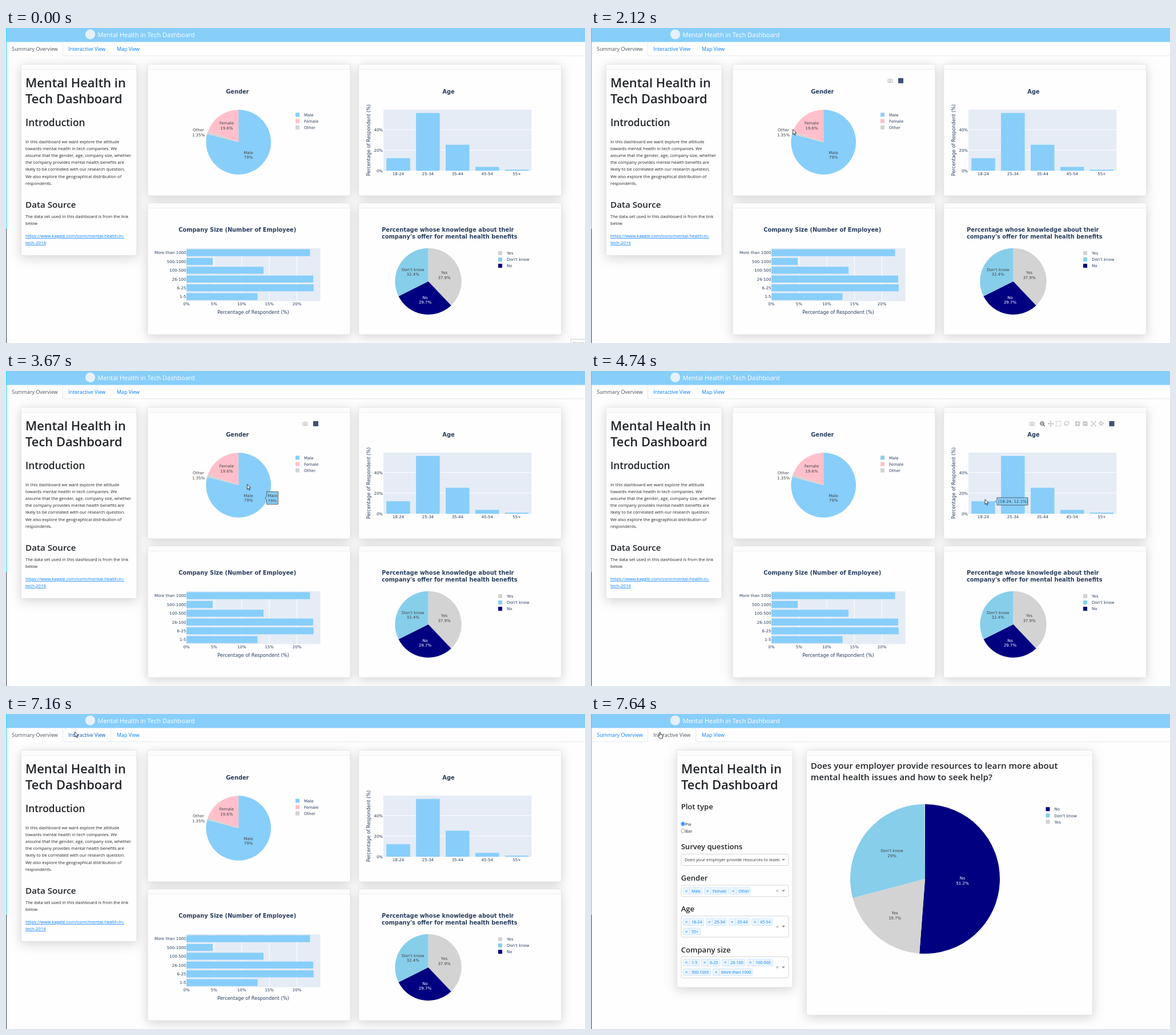
Recreate the animation shown at these times as an HTML page. Size 1014 px wide and 552 px high, loop 8000 ms.

```html
<!DOCTYPE html>
<html lang="en">
<head>
<meta charset="utf-8">
<title>Mental Health in Tech Dashboard</title>
<style>
html, body { margin: 0; width: 100%; height: 100%; overflow: hidden; background: #fefefe; }
svg { display: block; width: 100vw; height: 100vh; }
text { font-family: "Open Sans", "Noto Sans", sans-serif; white-space: pre; }
.h { font-weight: 600; }
.p, .b { font-family: "DejaVu Sans", sans-serif; }
.b { font-weight: 700; }
.card { fill: #fefefe; stroke: #dfdfdf; stroke-width: .7; filter: drop-shadow(0 4.7px 9.4px rgba(0,0,0,.17)); }
.icon { fill: none; stroke: #c4c4c4; stroke-width: 1.2; }
</style>
</head>
<body>
<svg id="stage" viewBox="0 0 1014 552"></svg>
<script>
const SKY = '#87cefa', NAVY = '#000080', GRAY = '#d3d3d3', PINK = '#ffc0cb', CYAN = '#87ceeb';
const INK = '#212529', PLOT = '#2a3f5f', LINK = '#007bff', DARK = '#444';

const rect = (x, y, w, h, fill, extra = '') =>
  `<rect x="${x}" y="${y}" width="${w}" height="${h}" fill="${fill}" ${extra}/>`;
const path = (d, extra = '') => `<path d="${d}" ${extra}/>`;
const text = (x, y, s, size, fill = INK, cls = '', anchor = 'start', extra = '') =>
  `<text x="${x}" y="${y}" font-size="${size}" fill="${fill}" class="${cls}" text-anchor="${anchor}" ${extra}>${s}</text>`;
const lines = (x, y, step, list, size, fill, cls, anchor, extra) =>
  list.map((s, i) => text(x, y + i * step, s, size, fill, cls, anchor, extra)).join('');
const plot = (x, y, s, anchor = 'middle', fill = PLOT, size = 7) => text(x, y, s, size, fill, 'p', anchor);
const group = (id, body) => `<g id="${id}">${body}</g>`;

const card = (x, y, w, h) => rect(x, y, w, h, '#fefefe', 'class="card" rx="2"') +
  rect(x, y + .4, w, 8.6, '#000', 'opacity=".008"') +
  path(`M${x} ${y + 9}h${w}`, 'stroke="#efefef"');

// Slices: [share, colour, label x, label y, name, label colour]
function pie(cx, cy, r, slices) {
  let from = 0, shapes = '', labels = '';
  const at = p => `${cx + r * Math.sin(p * 2 * Math.PI)} ${cy - r * Math.cos(p * 2 * Math.PI)}`;
  for (const [share, fill, x, y, name, ink = DARK] of slices) {
    const to = from + share / 100;
    shapes += path(`M${cx} ${cy}L${at(from)}A${r} ${r} 0 ${+(share > 50)} 1 ${at(to)}Z`, `fill="${fill}"`);
    labels += lines(x, y, 8.7, [name, share + '%'], 7, ink, 'p', 'middle');
    from = to;
  }
  return shapes + labels;
}
const legend = (x, y, items) => items.map(([fill, name], i) =>
  rect(x, y + i * 11.1, 7, 7, fill) + plot(x + 15, y + 6.2 + i * 11.1, name, 'start')).join('');

function ageChart() {
  let s = rect(661, 143, 259.5, 107, '#e5ecf6') + path('M661 178H920.5M661 214H920.5', 'stroke="#fff"');
  [['18-24', 22], ['25-34', 101.3], ['35-44', 45.6], ['45-54', 6.8], ['55+', 2]].forEach(([name, h], i) => {
    s += rect(666.2 + i * 51.9, 250.2 - h, 41.5, h, SKY) + plot(687 + i * 51.9, 258, name);
  });
  ['0%', '20%', '40%'].forEach((v, i) => s += plot(660, 252.7 - i * 36.1, v, 'end'));
  return s + text(0, 0, 'Percentage of Respondent (%)', 8.25, PLOT, 'p', 'middle', 'transform="translate(637.5 196.5) rotate(-90)"');
}
function companyChart() {
  let s = rect(316, 386, 234.5, 92.5, '#e5ecf6');
  for (let i = 0; i < 5; i++) {
    if (i) s += path(`M${316 + i * 48.4} 386v92.5`, 'stroke="#fff"');
    s += plot(316 + i * 48.4, 486, i * 5 + '%');
  }
  [['More than 1000', 216.5], ['500-1000', 46], ['100-500', 135], ['26-100', 222], ['6-25', 222.8], ['1-5', 124.5]]
    .forEach(([name, w], i) => {
      const y = 393.7 + i * 15.4;
      s += rect(316, y - 6.1, w, 12.2, SKY) + plot(315.5, y + 2.6, name, 'end');
    });
  return s + plot(433, 501, 'Percentage of Respondent (%)', 'middle', PLOT, 8.25);
}

const icon = (x, d, extra = '') => path(d, `class="icon" transform="translate(${x} 0)" ${extra}`);
const camera = x => icon(x, 'M-4-2H-2L-1-3.3H1L2-2H4V3H-4ZM0-1A1.4 1.4 0 1 1-.1-1Z');
// Right end of the toolbar sits at x = 0
const tools = full => rect(-9.5, -4.5, 9, 9, '#3f4f75') + (!full ? camera(-23.5) :
  camera(-144.5) +
  icon(-126.5, 'M1.5 1.5L4.3 4.3M-.5-3.5A3 3 0 1 1-.6-3.5ZM-2-.5H1', 'style="stroke:#808080;stroke-width:1.7"') +
  icon(-112, 'M-4.5 0H4.5M0-4.5V4.5M-1.3-3.2L0-4.5 1.3-3.2M-1.3 3.2L0 4.5 1.3 3.2M-3.2-1.3L-4.5 0-3.2 1.3M3.2-1.3L4.5 0 3.2 1.3') +
  icon(-98, 'M-4-4H4V4H-4Z', 'stroke-dasharray="1.6 1"') +
  icon(-84, 'M-3 2C-6-1-2-4 1-4S5-1 3 1-2 3-3 1-1 2-2 4.5') +
  icon(-65, 'M-4 0H4', 'style="stroke-width:8"') + icon(-65, 'M-2.5 0H2.5M0-2.5V2.5', 'style="stroke:#fff"') +
  icon(-51.5, 'M-4 0H4', 'style="stroke-width:8"') + icon(-51.5, 'M-2.5 0H2.5', 'style="stroke:#fff"') +
  icon(-37, 'M-4-2V-4H-2M2-4H4V-2M4 2V4H2M-2 4H-4V2M-2.5-2.5L2.5 2.5M2.5-2.5L-2.5 2.5') +
  icon(-23.5, 'M-4.5 0L0-3.8 4.5 0M-2 0V3.5M2 0V3.5M-2.5 1H2.5', 'style="stroke-width:1.7"'));
const toolbar = (id, x, y, full) => group(id, `<g transform="translate(${x} ${y})">${tools(full)}</g>`);

// Hover label whose arrow touches (x, y); dir 1 opens to the right, -1 to the left
function hover(id, x, y, dir, w, list, fill) {
  const h = list.length * 9 + 4, left = dir > 0 ? x + 3 : x - 3 - w;
  return group(id, path(`M${x} ${y}l${3 * dir}-3V${y - h / 2}h${w * dir}v${h}h${-w * dir}V${y + 3}Z`, `fill="${fill}" stroke="${DARK}" stroke-width=".8"`) +
    lines(left + 2, y - h / 2 + 9, 9, list, 7, DARK, 'p'));
}

const title = (x, y) => lines(x, y, 28, ['Mental Health in', 'Tech Dashboard'], 21.9, INK, 'h');
const chartTitle = (x, y, list, anchor = 'middle') => lines(x, y, 12.7, list, 9.85, PLOT, 'b', anchor);

const summary = () =>
  card(26.5, 63.5, 202.5, 335) + card(248, 63.5, 355, 230.5) + card(617.7, 63.5, 355, 230.5) +
  card(248, 306.7, 355, 230.5) + card(617.7, 306.7, 355, 230.5) +
  title(34, 103.5) + text(34, 172, 'Introduction', 17.35, INK, 'h') + text(34, 315, 'Data Source', 15.2, INK, 'h') +
  lines(34, 201.8, 12.15, ['In this dashboard we want explore the attitude', 'towards mental health in tech companies. We',
    'assume that the gender, age, company size, whether', 'the company provides mental health benefits are',
    'likely to be correlated with our research question.', 'We also explore the geographical distribution of', 'respondents.'], 7.57) +
  lines(34, 333, 12.15, ['The data set used in this dashboard is from the link', 'below'], 7.57) +
  lines(34, 367, 12.15, ['https://www.kaggle.com/osmi/mental-health-in-', 'tech-2016'], 7.77, LINK, '', 'start', 'text-decoration="underline"') +
  chartTitle(405.3, 114.5, ['Gender']) + chartTitle(775, 114.5, ['Age']) +
  chartTitle(405.3, 356.6, ['Company Size (Number of Employee)']) +
  chartTitle(658, 356.6, ['Percentage whose knowledge about their', "company's offer for mental health benefits"], 'start') +
  pie(407.2, 200, 56.8, [[79, SKY, 424.5, 220.7, 'Male'], [1.35, GRAY, 337, 181, 'Other'], [19.6, PINK, 386.3, 169, 'Female']]) +
  legend(507, 148.5, [[SKY, 'Male'], [PINK, 'Female'], [GRAY, 'Other']]) +
  pie(739.5, 444, 58.2, [[37.9, GRAY, 767.5, 431, 'Yes'], [29.7, NAVY, 734, 474.7, 'No', '#fff'], [32.4, CYAN, 712.7, 425.7, "Don't know"]]) +
  legend(862, 391, [[GRAY, 'Yes'], [CYAN, "Don't know"], [NAVY, 'No']]) +
  ageChart() + companyChart() +
  toolbar('genderBar', 547.5, 92.3) + toolbar('ageBar', 917, 92.3, true) +
  toolbar('companyBar', 547.5, 335.3, true) + toolbar('benefitBar', 917, 335.3) +
  hover('femaleTip', 365, 171, -1, 29, ['Female', '19.6%'], PINK) +
  hover('maleTip', 453.5, 222.5, 1, 20, ['Male', '79%'], SKY) +
  hover('youngTip', 708, 228.5, 1, 54, ['(18-24, 12.1%)'], SKY) +
  hover('adultTip', 759.5, 149, 1, 54, ['(25-34, 55.9%)'], SKY);

const select = (y, h) => rect(158, y, 188, h, '#fff', 'stroke="#ccc" stroke-width=".8" rx="2.4"') +
  path(`M334 ${y + h / 2 - 1.4}h6l-3 3Z`, 'fill="#888"');
const tag = (x, y, w, s) => rect(x, y - 6, w, 12, '#ebf5ff', 'stroke="#c2e0ff" stroke-width=".7" rx="1.2"') +
  path(`M${x + 11} ${y - 6}v12`, 'stroke="#c2e0ff" stroke-width=".7"') +
  text(x + 5.5, y + 2.5, '×', 7.4, '#007eff', '', 'middle') + text(x + 14.5, y + 2.6, s, 7.08, '#007eff');
const tags = (y, list) => list.map(([x, w, s]) => tag(x, y, w, s)).join('');

const interactive = () =>
  card(150.5, 63.5, 202.5, 415.5) + card(377.3, 63.5, 501, 464.3) + title(158, 103.5) +
  [['Plot type', 167], ['Survey questions', 237.3], ['Gender', 291.8], ['Age', 346.3], ['Company size', 417.5]]
    .map(([s, y]) => text(157.7, y, s, 13.07, INK, 'h')).join('') +
  '<circle cx="161" cy="192.5" r="3.2" fill="#fff" stroke="#0075ff"/><circle cx="161" cy="192.5" r="2" fill="#0075ff"/>' +
  '<circle cx="161" cy="204.7" r="3.2" fill="#fff" stroke="#767676" stroke-width=".7"/>' +
  lines(165, 195.8, 12.2, ['Pie', 'Bar'], 7.6) +
  select(245.5, 20) + select(300, 20) + select(354, 37) + select(425.5, 37) +
  text(164, 258.3, 'Does your employer provide resources to learn.', 7.6, '#333') +
  tags(310, [[161.5, 33.5, 'Male'], [198.5, 43, 'Female'], [243.5, 35.5, 'Other']]) +
  tags(364.5, [[161.5, 36, '18-24'], [201.5, 36, '25-34'], [241.5, 36, '35-44'], [281.5, 36.5, '45-54']]) +
  tags(381, [[161.5, 30, '55+']]) +
  tags(435.7, [[161.5, 28.5, '1-5'], [193.5, 32.5, '6-25'], [229.7, 40, '26-100'], [273.5, 44.5, '100-500']]) +
  tags(452.2, [[161.5, 48, '500-1000'], [213.5, 69, 'More than 1000']]) +
  group('clear', [255.5, 310, 373, 444].map(y => text(326, y + 3, '×', 9, '#888', '', 'middle')).join('')) +
  group('result',
    lines(384.7, 96, 20, ['Does your employer provide resources to learn more about', 'mental health issues and how to seek help?'], 15.2, INK, 'h') +
    pie(585, 289, 131, [[51.2, NAVY, 650.5, 290.3, 'No', '#fff'], [19.7, GRAY, 532, 351, 'Yes'], [29, CYAN, 527, 242.3, "Don't know"]]) +
    legend(796.5, 163.2, [[NAVY, 'No'], [CYAN, "Don't know"], [GRAY, 'Yes']]));

const tab = (id, x, s) => text(x, 40.2, s, 8.87, LINK, '', 'start', `id="${id}"`);
const stage = document.getElementById('stage');
stage.innerHTML =
  rect(0, 0, 1014, 552, '#fefefe') + rect(0, 0, 1014, 24.5, SKY) +
  '<circle cx="147.5" cy="11.2" r="8.6" fill="#e6f1fc"/>' +
  text(160.5, 15.8, 'Mental Health in Tech Dashboard', 10.97, '#fff') +
  tab('tab1', 10.3, 'Summary Overview') + tab('tab2', 109.3, 'Interactive View') + tab('tab3', 194, 'Map View') +
  path('', 'id="tabLine" fill="none" stroke="#dee2e6" stroke-width=".8"') +
  group('summary', summary()) + group('interactive', interactive()) +
  rect(0, 0, 1, 352, '#22e0f5') + rect(0, 352, 1, 200, '#333c46') +
  group('status', rect(989.5, 545.5, 30, 12, '#fff', 'stroke="#ccc"') + text(993, 554, 'Search', 6, '#777')) +
  group('arrow', path('M0 0V8.8L2 7 3.4 10.2 4.8 9.6 3.4 6.4H6.2Z', 'fill="#fff" stroke="#111" stroke-width=".8"')) +
  group('hand', path('M-.9 6.8V1Q0-.4 .9 1V4.2L4 4.9Q5.3 5.3 5 7L4.3 11.3H-.4L-3 7.6Q-3.4 6-2 6.2Z',
    'fill="#fff" stroke="#111" stroke-width=".8" transform="translate(120.8 31.6)"'));

const el = {};
stage.querySelectorAll('[id]').forEach(e => el[e.id] = e);

// Pointer track: [ms, x, y]
const track = [[680, 730, 545], [950, 600, 498], [1300, 375, 427], [1640, 375, 427], [1780, 312, 335], [1890, 288, 270],
  [2000, 318, 205], [2120, 353.5, 177.7], [2400, 358, 173], [2700, 385, 178], [2900, 408, 192], [3070, 416.5, 199],
  [3610, 416.5, 199], [3670, 422, 198.7], [3870, 500, 190], [4120, 615, 205], [4410, 670.5, 229.5], [4480, 677, 235.5],
  [4670, 677, 235.5], [5010, 739.5, 184.5], [5340, 739.5, 184.5], [5410, 751.5, 193.5], [5640, 751.5, 193.5],
  [5810, 577.7, 167], [6050, 370, 122], [6430, 191, 79], [6980, 120.7, 31.3], [8000, 120.7, 31.3]];

function pointer(t) {
  const i = Math.max(1, track.findIndex(k => k[0] > t));
  const [a, x0, y0] = track[i - 1], [b, x1, y1] = track[i], p = (t - a) / (b - a);
  return [x0 + (x1 - x0) * p, y0 + (y1 - y0) * p];
}
const fade = (t, a, b) => Math.max(0, Math.min(1, (t - a) / 200, (b - t) / 200));
const show = (id, on) => el[id].style.display = on ? '' : 'none';
const within = (t, a, b) => t >= a && t < b;

function draw(t) {
  const second = t >= 7230, hovered = t >= 6900;
  show('summary', !second);
  show('interactive', second);
  show('result', t >= 7570);
  show('status', t < 70);
  show('arrow', within(t, 680, 7230));
  show('hand', second);
  show('femaleTip', within(t, 2470, 2880));
  show('maleTip', within(t, 2900, 3730));
  show('youngTip', within(t, 4400, 4780));
  show('adultTip', within(t, 4940, 5680));
  el.clear.setAttribute('opacity', t < 7360 ? .15 : 1);
  el.genderBar.setAttribute('opacity', Math.max(fade(t, 1850, 4000), fade(t, 5830, 6350)));
  el.ageBar.setAttribute('opacity', fade(t, 4020, 6050));
  el.companyBar.setAttribute('opacity', fade(t, 1050, 1950));
  el.benefitBar.setAttribute('opacity', fade(t, 650, 1250));
  el.tab1.setAttribute('fill', !second ? '#495057' : t < 7360 ? '#2f5d8c' : LINK);
  el.tab2.setAttribute('fill', second ? '#495057' : hovered ? '#0056b3' : LINK);
  el.tabLine.setAttribute('d', second ? 'M0 48.7H99.5V25M183.7 25V48.7H1014'
    : 'M99.5 25V48.7H1014' + (hovered ? 'M183.7 25V48.7' : ''));
  if (t >= 680) el.arrow.setAttribute('transform', `translate(${pointer(t)})`);
}
function loop() {
  draw(performance.now() % 8000);
  requestAnimationFrame(loop);
}
loop();
</script>
</body>
</html>
```
